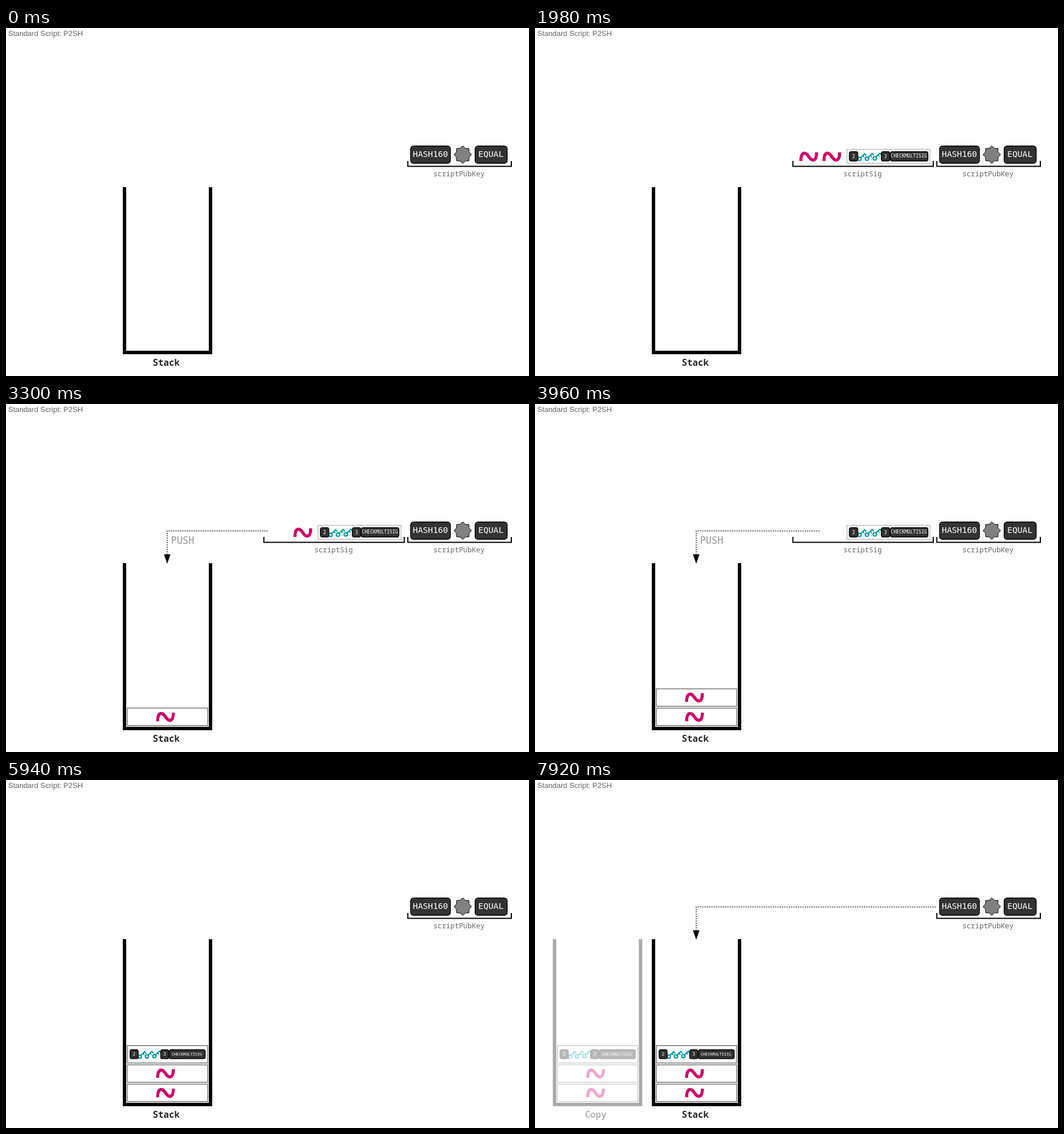
An HTML page for the animation above (8 s loop, 918 px wide and 610 px high).

```html
<!DOCTYPE html>
<html lang="en">
<head>
<meta charset="utf-8">
<title>Standard Script: P2SH</title>
<style>
  html, body { margin: 0; width: 100%; height: 100%; overflow: hidden; background: #fff; }
  svg { display: block; width: 918px; height: 610px; }
  text { font-family: "DejaVu Sans Mono", monospace; }
  .title { font: 13px "Liberation Sans", Arial, sans-serif; fill: #666; }
  .label { font: 12.5px "Noto Sans Mono", monospace; fill: #666; text-anchor: middle; }
  .name { font: 600 15.8px "Noto Sans Mono", monospace; fill: #222; text-anchor: middle; }
  .op { font-size: 14.7px; fill: #fff; text-anchor: middle; }
  .small { fill: #fff; text-anchor: middle; }
  .tile { fill: #333; stroke: #111; stroke-width: 1.8; }
  .row { fill: #fff; stroke: #555; stroke-width: 1.2; }
  .line { fill: none; stroke: #000; stroke-width: 2; }
  .jar { fill: none; stroke: #000; stroke-width: 6; }
</style>
</head>
<body>
<svg viewBox="0 0 918 610">
  <defs>
    <path id="sig" d="M2.7 16C2.7-1 11 0 16.5 8.5S30.3 18 30.3 1" fill="none" stroke="#c06" stroke-width="5.4"/>
    <g id="key" fill="none" stroke="#099" stroke-width="2.2">
      <circle r="3"/>
      <path d="M2.2-2.2L9-9l3 3M5.8-5.8l2.6 2.6"/>
    </g>
    <g id="multisig">
      <use href="#key" x="18.5" y="13.5"/>
      <use href="#key" x="31.7" y="13"/>
      <use href="#key" x="45.3" y="12.5"/>
      <g class="tile">
        <rect x=".9" y=".9" width="14.6" height="16.2" rx="3"/>
        <rect x="57" y=".9" width="14.6" height="16.2" rx="3"/>
        <rect x="72.9" y=".9" width="65.6" height="16.2" rx="3"/>
      </g>
      <g class="small" font-size="8.2">
        <text x="8.2" y="11.8">2</text>
        <text x="64.3" y="11.8">3</text>
      </g>
    </g>
    <path id="jar" class="jar" d="M208 279V568.8H359V279"/>
    <g id="row1"><rect class="row" x="213" y="533" width="141" height="30.5"/><use href="#sig" x="263.5" y="540"/></g>
    <g id="row2"><rect class="row" x="213" y="499.3" width="141" height="30.5"/><use href="#sig" x="263.5" y="506"/></g>
    <g id="row3">
      <rect class="row" x="213" y="465.6" width="141" height="30.5"/>
      <use href="#multisig" transform="translate(217 472) scale(.957)"/>
      <text class="small" x="317.5" y="482.6" font-size="6.8">CHECKMULTISIG</text>
    </g>
  </defs>

  <text class="title" x="4" y="14">Standard Script: P2SH</text>

  <rect class="tile" x="710.3" y="206.8" width="69.6" height="30.4" rx="5"/>
  <text class="op" x="745" y="226">HASH160</text>
  <path id="star" fill="#808080" stroke="#000"/>
  <rect class="tile" x="823.6" y="206.8" width="56" height="30.4" rx="5"/>
  <text class="op" x="851.2" y="226">EQUAL</text>
  <path class="line" d="M705.3 233V242.4H887V233"/>
  <text class="label" x="795" y="260">scriptPubKey</text>

  <g data-on="1320 5940">
    <path class="line" d="M452.6 233V242.4H699V233"/>
    <text class="label" x="575" y="260">scriptSig</text>
  </g>
  <use href="#sig" x="464" y="217" data-on="1320 3300"/>
  <use href="#sig" x="504.5" y="217" data-on="1320 3960"/>
  <g data-on="1320 4620">
    <rect x="547.6" y="212.6" width="145.6" height="24.6" fill="#fff" stroke="#bbb" stroke-width="1.4"/>
    <use href="#multisig" x="551" y="216"/>
    <text class="small" x="656.3" y="227.3" font-size="8.1">CHECKMULTISIG</text>
  </g>

  <g id="arrow">
    <path id="dots" fill="none" stroke="#222" stroke-width="1.4" stroke-dasharray="2 2"/>
    <path d="M277.3 263.5H288.7L283 280Z"/>
  </g>
  <text x="289.5" y="245" font-size="17" fill="#999" data-on="3300 5280">PUSH</text>

  <use href="#jar"/>
  <use href="#row1" data-on="3300 8000"/>
  <use href="#row2" data-on="3960 8000"/>
  <use href="#row3" data-on="4620 8000"/>
  <text class="name" x="281.3" y="592">Stack</text>

  <g data-on="6600 8000" opacity=".333" transform="translate(-173.7 0)">
    <use href="#jar"/>
    <use href="#row1"/>
    <use href="#row2"/>
    <use href="#row3"/>
    <text class="name" x="280.3" y="592">Copy</text>
  </g>
</svg>
<script>
const LOOP = 8000;
const byId = id => document.getElementById(id);
const show = (el, on) => el.setAttribute("visibility", on ? "visible" : "hidden");

const corners = Array.from({ length: 16 }, (_, i) => {
  const r = i % 2 ? 12 : 15.4, a = i * Math.PI / 8;
  return `${801.8 + r * Math.sin(a)} ${222 - r * Math.cos(a)}`;
});
byId("star").setAttribute("d", `M${corners.join("L")}Z`);

const timed = [...document.querySelectorAll("[data-on]")].map(el => {
  const [from, to] = el.dataset.on.split(" ").map(Number);
  return { el, from, to };
});

// Time and x of each arrow's tail; 0 means no arrow.
const tails = [[0, 0], [3300, 460], [3960, 501], [4620, 542], [5280, 0], [7920, 705]];

function draw(now) {
  const t = now % LOOP;
  for (const { el, from, to } of timed) show(el, t >= from && t < to);
  const tail = tails.findLast(([start]) => t >= start)[1];
  show(byId("arrow"), tail > 0);
  byId("dots").setAttribute("d", `M283 264V222.5H${tail || 283}`);
  requestAnimationFrame(draw);
}
draw(performance.now());
</script>
</body>
</html>
```
